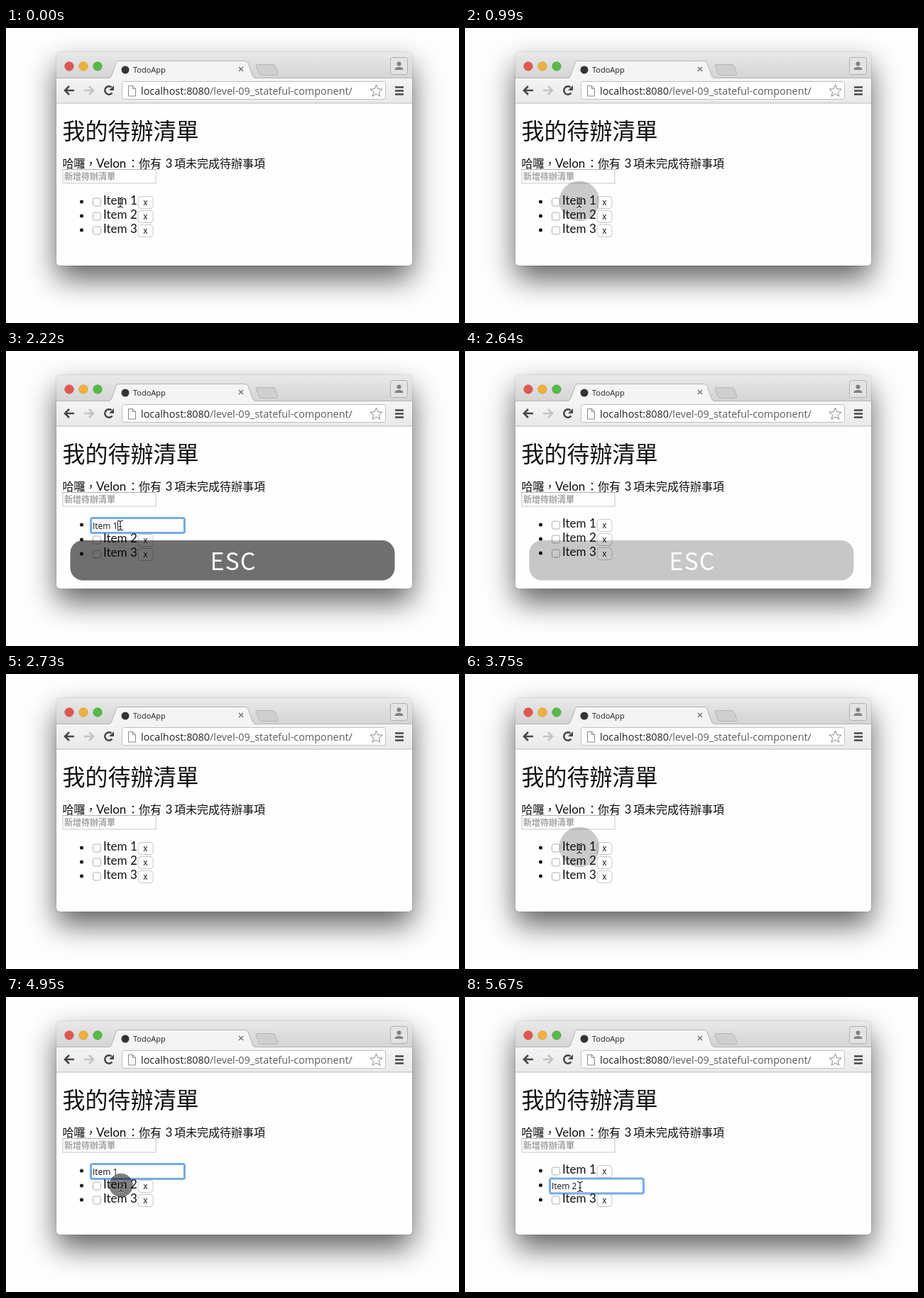
These frames come from a looping animation (638 px wide and 416 px high, 5700 ms). An HTML page:

```html
<!DOCTYPE html>
<html lang="zh-TW">
<head>
<meta charset="utf-8">
<title>TodoApp</title>
<style>
  html, body { margin: 0; width: 100%; height: 100%; overflow: hidden; background: #fefefe; }
  #window {
    position: absolute; left: 71px; top: 34px; width: 501px; height: 301px; border-radius: 5px;
    background: #fefefe; box-shadow: 0 19px 42px rgba(0,0,0,.62), 0 0 2px rgba(0,0,0,.25);
  }
  svg { position: absolute; left: 0; top: 0; width: 638px; height: 416px; }
  .ui { font-family: "Open Sans", sans-serif; font-weight: 500; }
  .page { font-family: Lato, "Noto Sans CJK TC", sans-serif; font-size: 17px; fill: #111; }
  .cjk { font-family: "Noto Sans CJK TC", "Noto Sans CJK JP", sans-serif; }
</style>
</head>
<body>
<div id="window"></div>
<svg viewBox="0 0 638 416">
  <defs>
    <linearGradient id="bar" x2="0" y2="1">
      <stop stop-color="#e9e9e9"/><stop offset="1" stop-color="#d4d4d4"/>
    </linearGradient>
    <linearGradient id="tools" x2="0" y2="1">
      <stop stop-color="#f4f4f4"/><stop offset="1" stop-color="#e9e9e9"/>
    </linearGradient>
    <filter id="glow" x="-10%" y="-40%" width="120%" height="180%"><feGaussianBlur stdDeviation=".7"/></filter>
  </defs>

  <!-- title bar and tab -->
  <path d="M71 70V39q0-5 5-5H567q5 0 5 5V70z" fill="url(#bar)"/>
  <path d="M71 70.5H572" stroke="#b4b4b4"/>
  <g stroke-width=".7">
    <circle cx="89" cy="54" r="6.2" fill="#df5850" stroke="#cc4d46"/>
    <circle cx="109" cy="54" r="6.2" fill="#efb03c" stroke="#d89d33"/>
    <circle cx="129" cy="54" r="6.2" fill="#57b94a" stroke="#4aa53e"/>
  </g>
  <path d="M145 71q3-1 4-4l6-18q1-3 4-3H337q3 0 4 3l6 18q1 3 4 4z" fill="#f4f4f4"/>
  <path d="M145 70.5q3-1 4-4l6-17q1-3 4-3H337q3 0 4 3l6 17q1 3 4 4" fill="none" stroke="#b2b2b2"/>
  <path d="M353 51.5H376q2 0 3 2l4 11q0 2-2 2H360q-3 0-4-3l-4-10q0-2 1-2z" fill="#cfcfcf" stroke="#b6b6b6"/>
  <circle cx="168" cy="59" r="5.5" fill="#333"/>
  <text class="ui" x="179" y="63" font-size="11" fill="#222">TodoApp</text>
  <path d="M328 55l6 6m0-6l-6 6" stroke="#777" stroke-width="1.5"/>
  <rect x="541.5" y="41.5" width="24" height="24" rx="3" fill="#e3e3e3" stroke="#b0b0b0"/>
  <circle cx="553.5" cy="50.5" r="3" fill="#808080"/>
  <path d="M547.5 59v-1q1-3 6-3t6 3v1z" fill="#808080"/>

  <!-- toolbar -->
  <path d="M71 71H572V106H71z" fill="url(#tools)"/>
  <path d="M71 106H572" stroke="#bbb"/>
  <g fill="none" stroke="#484848" stroke-width="2.6">
    <path d="M96 88H83m6-6l-6 6 6 6"/>
    <path d="M110 88h13m-6-6l6 6-6 6" stroke="#c4c4c4"/>
    <path d="M149.500 91.500A5.700 5.700 0 1 1 148.500 83.500"/>
    <path d="M548 83.500h12m-12 5h12m-12 5h12"/>
  </g>
  <path d="M152 81v7h-7z" fill="#484848"/>
  <rect x="163.500" y="75.500" width="371" height="25" rx="3" fill="#fff" stroke="#c0c0c0"/>
  <path d="M172.500 81.500h6l4 4v10.500h-10zm6 0v4h4" fill="#fff" stroke="#888"/>
  <text class="ui" x="190" y="94" font-size="14.400" fill="#222">localhost:8080<tspan fill="#5c5c5c">/level-09_stateful-component/</tspan></text>
  <path id="star" fill="#fff" stroke="#888" stroke-linejoin="round"/>

  <!-- page -->
  <text class="cjk" x="79.500" y="157" font-size="32" font-weight="500" fill="#111">我的待辦清單</text>
  <g class="page">
    <g class="cjk" font-size="16">
      <text x="79.500" y="196.500">哈囉，</text>
      <text x="171" y="196.500">：你有</text>
      <text x="237" y="196.500">項未完成待辦事項</text>
    </g>
    <text x="127" y="196.500">Velon</text>
    <text x="224.500" y="196.500">3</text>
  </g>
  <rect x="80" y="199.500" width="131" height="19.500" fill="none" stroke="#c8c8c8"/>
  <path d="M79.500 199.500h132" stroke="#b0b0b0"/>
  <text class="cjk" x="82" y="213.500" font-size="12" font-weight="700" fill="#a2a2a2">新增待辦清單</text>
  <g id="list"></g>

  <circle id="pulse"/>
  <g id="overlay">
    <rect x="90.500" y="267" width="457" height="56.500" rx="18" opacity=".56"/>
    <text class="cjk" x="320" y="309" font-size="34" letter-spacing="1" text-anchor="middle" fill="#fff">ESC</text>
  </g>
  <g id="cursor" fill="none">
    <path d="M-4-7q4 0 4 3V4q0 3-4 3M4-7q-4 0-4 3V4q0 3 4 3M-2 1.500h4" stroke="#fff" stroke-width="2.400" opacity=".6"/>
    <path d="M-4-7q4 0 4 3V4q0 3-4 3M4-7q-4 0-4 3V4q0 3 4 3M-2 1.500h4" stroke="#222" stroke-width="1.100"/>
  </g>
</svg>
<script>
const LOOP = 5700, PULSE = 360, BLINK = 500;
const $ = id => document.getElementById(id);
const clamp = v => Math.min(1, Math.max(0, v));
const ramp = (t, from, to) => clamp((t - from) / (to - from));

// Which row is being edited, and when
const edits = [
  { row: 0, from: 1080, to: 2580 },
  { row: 0, from: 4030, to: 5165 },
  { row: 1, from: 5165, to: LOOP },
];
const clicks = [630, 840, 3600, 3810, 4770, 4890];
const rest = [161, 246], target = [162, 267.5];

$('star').setAttribute('d', 'M' + Array.from({ length: 10 }, (_, i) => {
  const r = i % 2 ? 4 : 9, a = (i / 5 - .5) * Math.PI;
  return `${521.5 + r * Math.cos(a)} ${89 + r * Math.sin(a)}`;
}).join('L') + 'Z');

$('list').innerHTML = [0, 1, 2].map(i => `
  <g class="row">
    <circle cx="106.500" cy="245" r="2.500" fill="#111"/>
    <g class="view">
      <rect x="122.500" y="240" width="11" height="11" rx="2.500" fill="#fff" stroke="#b0b0b0"/>
      <text class="page" x="137" y="249">Item ${i + 1}</text>
      <rect x="186" y="237.500" width="21" height="17" rx="4" fill="#fff" stroke="#c8c8c8"/>
      <text class="ui" x="196.500" y="250" font-size="12" text-anchor="middle" fill="#111">x</text>
    </g>
    <g class="edit">
      <rect x="119.500" y="235.500" width="132" height="21" rx="2.500" fill="none" stroke="#79aeea" stroke-width="3" filter="url(#glow)"/>
      <rect x="120.500" y="236.500" width="130" height="19" fill="#fff" stroke="#6fa3e0"/>
      <text class="ui" x="122" y="250.500" font-size="12" fill="#111">Item ${i + 1}</text>
      <path class="caret" d="M157.500 239v14" stroke="#111"/>
    </g>
  </g>`).join('');
const rows = [...document.querySelectorAll('.row')];
const show = (el, on) => { el.style.display = on ? '' : 'none'; };

function cursorAt(t) {
  const p = ramp(t, 4180, 4530), k = p * p * (3 - 2 * p);
  return rest.map((v, i) => v + (target[i] - v) * k);
}

function render(t) {
  const edit = edits.find(e => t >= e.from && t < e.to);
  rows.forEach((row, i) => {
    const editing = !!edit && edit.row === i;
    const shift = edit && i >= edit.row ? 1 : 0;
    row.setAttribute('transform', `translate(0 ${i * 20 + (editing ? i * .5 : shift)})`);
    show(row.querySelector('.view'), !editing);
    show(row.querySelector('.edit'), editing);
    show(row.querySelector('.caret'), editing && (t - edit.from) % (2 * BLINK) < BLINK);
  });

  const [x, y] = cursorAt(t);
  $('cursor').setAttribute('transform', `translate(${x} ${y})`);
  show($('cursor'), t < 2580 || t >= 3300);

  // The newest click replaces the ring of the one before it
  const start = clicks.filter(c => c <= t).pop();
  const p = start === undefined ? 1 : ramp(t, start, start + PULSE);
  const pulse = $('pulse');
  pulse.setAttribute('cx', x);
  pulse.setAttribute('cy', y - 2);
  pulse.setAttribute('r', 32 * (1 - (1 - p) ** 4));
  pulse.setAttribute('opacity', .8 * (1 - p) ** 2.5);

  $('overlay').setAttribute('opacity', ramp(t, 2100, 2220) * (1 - ramp(t, 2530, 2710)));
}

const begin = performance.now();
(function frame() {
  render((performance.now() - begin) % LOOP);
  requestAnimationFrame(frame);
})();
</script>
</body>
</html>
```
